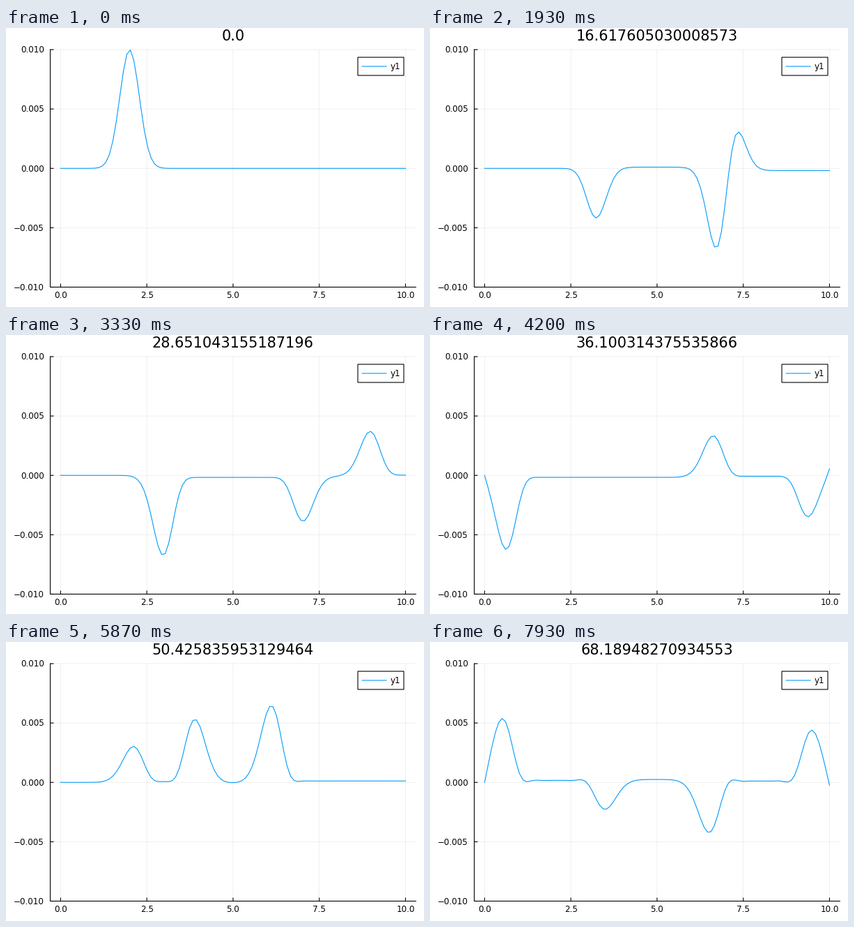
A matplotlib script for the animation above (8000 ms loop, 600 by 400 pixels).

```python
import numpy as np
import matplotlib.pyplot as plt
from matplotlib.animation import FuncAnimation
from matplotlib.patches import Rectangle

STATES = 120                   # distinct pictures in one loop
TICKS = 400                    # 20 ms clock, so pictures last 60 or 80 ms
LOOP_MS = 8000
W, H, DPI = 600, 400, 100
STEP = 0.5730208631037439      # simulated time per picture
BLUE = "#009AFA"
PX = 72 / DPI                  # one pixel in points

# Plot area in pixels
LEFT, RIGHT, TOP, BOTTOM = 63.5, 588.3, 31.0, 371.5


def to_x(v):
    return 78.4 + 49.5 * v


def to_y(v):
    return 201.25 - 17025 * v


def simulate(substeps=2):
    """Damped waves on a light string (0..10) tied to a heavy one (10..15)."""
    n1, n2 = 99, 49
    x = np.concatenate([np.linspace(0, 10, n1 + 1), np.linspace(10, 15, n2 + 1)[1:]])
    dx = np.diff(x)
    heavy = np.arange(n1 + n2) >= n1
    rho = np.where(heavy, 8.0, 1.0)
    tension = 0.1 * rho
    mass = (rho * dx)[:-1] / 2 + (rho * dx)[1:] / 2
    damp = 0.02
    dt = STEP / substeps

    def accel(u):
        a = np.zeros_like(u)
        a[1:-1] = np.diff(tension * np.diff(u) / dx) / mass
        return a

    u = 0.01 * (np.exp(-(x - 2) ** 2 / 0.16) - np.exp(-(x - 12) ** 2 / 0.16))
    u[0] = u[-1] = 0
    prev = u + 0.5 * dt ** 2 * accel(u)
    k = damp * dt / 2
    shots = []
    for i in range(STATES * substeps):
        if i % substeps == 0:
            shots.append(u[:n1 + 1].copy())
        if i == 0:
            prev, u = u, prev
        else:
            prev, u = u, (2 * u - (1 - k) * prev + dt ** 2 * accel(u)) / (1 + k)
    return x[:n1 + 1], shots


def legend_corner(y):
    """First free corner: top right, top left, then bottom right."""
    right, left = X > 7.65, X < 2.35
    counts = [np.sum(right & (y > 0.005)), np.sum(left & (y > 0.005)),
              np.sum(right & (y < -0.005))]
    best = counts.index(min(counts))
    return [(505, 42), (81, 42), (505, 334.4)][best]


X, WAVES = simulate()

fig = plt.figure(figsize=(W / DPI, H / DPI), dpi=DPI, facecolor="white")
ax = fig.add_axes([0, 0, 1, 1])
ax.set_xlim(0, W)
ax.set_ylim(H, 0)
ax.axis("off")


def line(xs, ys, color="black", width=1.1, **kw):
    return ax.plot(xs, ys, color=color, lw=width * PX, snap=False, **kw)[0]


def label(x, y, s, size=11.9, **kw):
    return ax.text(x, y, s, fontsize=size * PX, family="DejaVu Sans",
                   va="baseline", **kw)


for v in (0, 2.5, 5, 7.5, 10):
    px = to_x(v)
    line([px, px], [TOP, BOTTOM], width=0.6, alpha=0.1, zorder=1)
    line([px, px], [BOTTOM, BOTTOM - 5], zorder=4, solid_capstyle="butt")
    label(px, 387.3, f"{v:.1f}", ha="center")
for v in (-0.01, -0.005, 0, 0.005, 0.01):
    py = to_y(v)
    line([LEFT, RIGHT], [py, py], width=0.6, alpha=0.1, zorder=1)
    line([LEFT, LEFT + 5], [py, py], zorder=4, solid_capstyle="butt")
    label(55, py + 4.3, f"{v:.3f}".replace("-", "\u2212"), ha="right")
line([LEFT, LEFT, RIGHT], [TOP, BOTTOM, BOTTOM], zorder=4)

title = label(325.9, 18.4, "", size=20.9, ha="center")
curve = line([], [], BLUE, zorder=3)
curve.set_clip_path(Rectangle((LEFT, TOP), RIGHT - LEFT, BOTTOM - TOP,
                              transform=ax.transData))

box = Rectangle((0, 0), 66, 26, fc="white", ec="black", lw=1.1 * PX,
                snap=False, zorder=5)
ax.add_patch(box)
key = line([], [], BLUE, zorder=6, solid_capstyle="butt")
name = label(0, 0, "y1", zorder=6)


def update(tick):
    i = (3 * tick + 2) // 10
    y = WAVES[i]
    curve.set_data(to_x(X), to_y(y))
    title.set_text(repr(i * STEP))
    bx, by = legend_corner(y)
    box.set_xy((bx, by))
    key.set_data([bx + 5.5, bx + 41.5], [by + 13, by + 13])
    name.set_position((bx + 46.2, by + 17.4))
    return curve, title, box, key, name


anim = FuncAnimation(fig, update, frames=TICKS, init_func=lambda: update(0),
                     interval=LOOP_MS / TICKS, repeat=True, repeat_delay=0)
plt.show()
```
